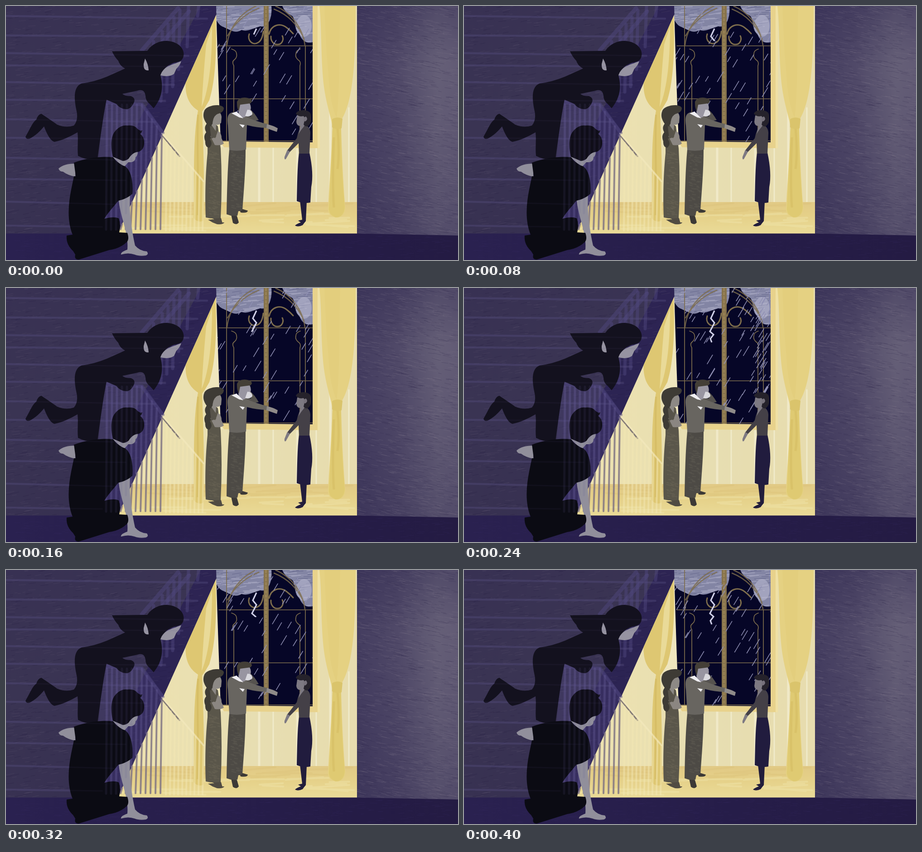
An HTML page that plays this animation: 998 by 561 pixels, repeating every 0.48 s.

```html
<!DOCTYPE html>
<html lang="en">
<head>
<meta charset="utf-8">
<title>Rainy evening on the stairs</title>
<style>
html, body { margin: 0; width: 100%; height: 100%; overflow: hidden; background: #30294f; }
svg { display: block; width: 100%; height: 100%; }
.gold { fill: none; stroke: #7d6d4c; stroke-width: 1.7; stroke-linecap: round; }
</style>
</head>
<body>
<svg viewBox="0 0 998 561" preserveAspectRatio="none">
<defs>
  <linearGradient id="leftWall" x2="1" y2="1">
    <stop offset="0" stop-color="#383153"/><stop offset=".25" stop-color="#3a3453"/>
    <stop offset=".7" stop-color="#352e50"/><stop offset="1" stop-color="#2c2354"/>
  </linearGradient>
  <linearGradient id="rightWall">
    <stop offset="0" stop-color="#443d60"/><stop offset=".4" stop-color="#504968"/>
    <stop offset=".8" stop-color="#655f77"/><stop offset="1" stop-color="#625b75"/>
  </linearGradient>
  <linearGradient id="shade" x2="0" y2="1">
    <stop offset="0" stop-color="#2c254d" stop-opacity=".35"/><stop offset=".25" stop-color="#2c254d" stop-opacity="0"/>
    <stop offset=".6" stop-color="#2c254d" stop-opacity=".1"/><stop offset="1" stop-color="#2c254d" stop-opacity=".3"/>
  </linearGradient>
  <linearGradient id="hall">
    <stop offset="0" stop-color="#2a2150"/><stop offset=".6" stop-color="#261d49"/><stop offset="1" stop-color="#241b43"/>
  </linearGradient>
  <linearGradient id="roomWall">
    <stop offset="0" stop-color="#efe3af"/><stop offset=".5" stop-color="#e7deb2"/><stop offset="1" stop-color="#e7dcae"/>
  </linearGradient>
  <linearGradient id="roomFloor" x2="0" y2="1">
    <stop offset="0" stop-color="#e1c985"/><stop offset=".4" stop-color="#e5d088"/><stop offset="1" stop-color="#eadb98"/>
  </linearGradient>
  <clipPath id="room"><path d="M473 0H775V503H247Z"/></clipPath>
  <clipPath id="pane"><path d="M464 0H677V301L474 299Q467 120 464 0Z"/></clipPath>
  <clipPath id="dark"><path d="M0 0H473L247 503H0Z"/></clipPath>
  <clipPath id="wallR"><path d="M775 0H998V507L775 503Z"/></clipPath>
  <clipPath id="clouds"><path d="M464 0H586C588 20 582 50 562 45C547 48 534 58 520 53C506 62 494 52 484 48Q470 44 464 30ZM610 0H677V80C665 84 652 77 648 61C635 55 641 32 632 22Q615 14 610 0Z"/></clipPath>
</defs>

<rect width="998" height="561" fill="url(#leftWall)"/>
<g id="stairs" clip-path="url(#dark)">
  <path d="M430 0H473L247 503H180L300 240Z" fill="#291f53" opacity=".75"/>
</g>

<g clip-path="url(#wallR)">
  <path d="M774 0H998V510H774Z" fill="url(#rightWall)"/>
  <path d="M774 0H998V510H774Z" fill="url(#shade)"/>
  <g id="wallGrain"></g>
</g>

<g clip-path="url(#room)">
  <path d="M230 0H776V504H230Z" fill="url(#roomWall)"/>
  <g id="paper"></g>
  <path d="M230 433H776V504H230Z" fill="url(#roomFloor)"/>
  <g id="boards"></g>
  <path d="M677 0H690V314L480 312L474 299L677 301Z" fill="#e8d28c"/>
  <path d="M688 0H693V314H688Z" fill="#efe0a4"/>
  <path d="M464 0L474 301L481 312L440 310L440 90Z" fill="#efe6be"/>
  <path d="M463 18C465 90 464 160 449 208Q442 221 433 233C435 290 439 380 436 474Q424 480 414 468C417 390 411 300 424 231C402 217 394 195 397 160Z" fill="#dec772"/>
  <path d="M455 45C455 110 450 180 432 223Q435 160 442 85Z" fill="#e9da98"/>
  <path d="M424 240C421 310 426 390 423 462" fill="none" stroke="#cfb75d" stroke-width="4" opacity=".55"/>
  <path d="M692 0H772C772 110 768 205 742 249Q738 262 740 274C742 330 745 400 749 443C750 461 740 468 728 467Q710 463 711 447C714 390 719 325 721 268C719 248 704 210 700 160C695 100 697 45 692 0Z" fill="#e5d182"/>
  <path d="M703 0H738C735 70 738 190 730 247C712 205 714 160 708 105Z" fill="#e0c976" opacity=".45"/>
  <path d="M721 268H740C740 340 744 400 748 443Q747 466 728 467Q712 461 713 446Q718 350 721 268Z" fill="#dfca72"/>
  <path d="M732 270Q737 325 732 360M724 290Q720 390 724 445" fill="none" stroke="#cfb55a" stroke-width="5" opacity=".4"/>
  <path d="M720 250Q731 243 743 249L741 270Q730 274 720 268Z" fill="#dac46c"/>
</g>

<g clip-path="url(#pane)">
  <path d="M460 0H680V304H460Z" fill="#060627"/>
  <g id="cloudInk" clip-path="url(#clouds)">
    <path d="M460 0H680V90H460Z" fill="#8385a4"/>
  </g>
  <ellipse cx="658" cy="44" rx="17" ry="24" fill="#bcbcd4" opacity=".55"/>
  <g class="gold">
    <path d="M470 88H677M472 205H677M474 298H677"/>
    <path d="M487 0V299M661 88V299"/>
    <path d="M498 95Q509 98 509 106Q511 113 504 119Q498 123 503 132V299"/>
    <path d="M650 95Q640 98 640 106Q638 113 645 119Q652 123 649 132V299"/>
    <path d="M488 86C493 45 520 14 552 0M489 66Q513 23 558 5" stroke-width="2.5" opacity=".8"/>
    <path d="M595 0C628 14 654 45 660 86M592 7Q637 25 658 72" stroke-width="2.5" opacity=".8"/>
    <path d="M537 62C532 76 545 88 556 81C564 77 567 66 568 56" stroke-width="3"/>
    <path d="M581 62C585 42 605 36 620 48Q628 54 634 61M585 67C584 78 592 86 600 85C610 85 614 73 610 66" stroke-width="3"/>
  </g>
  <path d="M569 0H580V301H569Z" fill="#85724c"/>
  <path d="M574 0V300" stroke="#9f8859" stroke-width="4" stroke-dasharray="7 2" opacity=".7"/>
  <path id="rain" fill="none" stroke="#8f8fb3" stroke-width="1.5" stroke-linecap="round"/>
  <path id="bolt" fill="none" stroke="#cfcfe7" stroke-width="3.2" stroke-linejoin="miter" pathLength="100" d="M553 50L545 67L553 77L543 96L551 103L544 112L547 120"/>
</g>

<!-- woman with a braid -->
<g>
  <path d="M446 472L458 471Q463 478 482 478Q480 483 466 482L456 478ZM444 466H472L475 469L478 480Q470 482 464 480L458 470Z" fill="#504b42"/>
  <path d="M450 262Q462 258 468 266L474 315Q478 390 474 468Q456 471 441 467C439 410 441 365 445 325L445 280Z" fill="#5a564a"/>
  <path d="M451 235Q474 227 476 245L475 258Q469 264 464 262L463 276L453 262Z" fill="#8d8985"/>
  <path d="M438 231C443 219 475 214 481 225Q481 235 468 238Q457 242 456 260Q450 267 452 280Q458 288 450 294Q458 304 449 313Q439 312 440 299Q435 287 442 279Q436 269 443 260Q432 245 438 231Z" fill="#3e3b35"/>
  <path d="M451 287L462 292L468 276Q476 280 476 292L481 304Q474 309 461 307Z" fill="#8b8681"/>
  <path d="M450 265Q464 272 464 289L453 293Z" fill="#57534a"/>
</g>

<!-- man pointing -->
<g>
  <path d="M496 456L510 464L514 478Q509 485 501 479ZM514 446L534 452Q533 458 518 456Z" fill="#3c3936"/>
  <path d="M493 317H529C529 360 525 410 522 450Q518 454 513 453L511 463Q499 465 487 460C488 410 489 360 493 317Z" fill="#4d4a45"/>
  <path d="M537 226Q549 236 558 252L531 257L529 242L541 244Z" fill="#56534f"/>
  <path d="M500 235C488 237 488 250 490 264L493 318Q512 322 530 317L532 263Q554 269 576 269L577 261Q551 254 532 246L520 237Z" fill="#686560"/>
  <path d="M576 261Q590 264 600 270L598 278L575 270Z" fill="#8f8b89"/>
  <path d="M512 218Q520 206 537 213Q546 228 533 240Q523 252 514 242Z" fill="#9895a1"/>
  <path d="M498 237L509 233L524 248L515 246ZM515 261L527 263L523 269Z" fill="#f0eff3"/>
  <path d="M533 229Q544 229 544 239Q538 246 528 243Z" fill="#d9d8de"/>
  <path d="M510 216C508 203 527 199 539 205Q546 209 540 215L517 218L514 233Q510 226 510 216Z" fill="#443f37"/>
</g>
<g id="cloth"></g>

<!-- woman in a long skirt -->
<g>
  <path d="M649 430L664 432L662 475Q657 481 655 484Q645 489 638 485Q642 481 651 478L645 474L654 472Z" fill="#221d3b"/>
  <path d="M647 324H670Q680 370 674 400L672 434Q658 437 642 431C643 395 643 355 647 324Z" fill="#211c3e"/>
  <path d="M655 262Q671 263 672 280L670 326H647L646 303L626 323L621 319L642 292Q646 271 655 262Z" fill="#444047"/>
  <path d="M621 318L627 322L618 338Q614 341 615 333ZM643 242Q659 235 661 252L658 266Q650 275 646 283L650 265Q642 265 641 256Z" fill="#7d7982"/>
  <path d="M640 238C643 229 662 227 671 235C677 244 674 267 662 266L657 262Q661 248 657 243Q647 246 640 238Z" fill="#25222b"/>
  <path d="M658 246Q664 241 665 250Q661 258 657 253Z" fill="#76717b"/>
</g>

<path d="M0 502.5H775L998 507V561H0Z" fill="url(#hall)"/>
<g id="hallGrain"></g>

<path d="M216 208L262 212L300 215L348 276L284 420L250 496L216 500L205 330Z" fill="#4b4278" opacity=".35" clip-path="url(#dark)"/>
<g id="rails"></g>

<!-- girl leaning over the rail -->
<path d="M234 100L312 99C322 84 338 77 354 77C380 78 395 94 392 110Q390 122 377 124C362 127 350 134 341 153C347 176 347 199 326 226Q320 219 317 216Q308 209 308 198C306 186 300 184 290 187Q271 191 257 194Q261 199 276 199Q286 203 283 212Q278 225 268 228Q254 229 243 216L222 207C215 240 207 300 202 338Q180 342 159 331C157 312 160 298 158 279C142 288 124 297 107 300Q96 298 84 266Q70 283 56 291Q46 297 43 289C53 272 58 257 67 251Q70 240 78 238Q96 250 113 262Q132 270 150 264Q161 251 155 228C150 203 149 178 167 171Q194 168 223 156L263 138Q252 133 248 121Q240 113 234 100Z" fill="#13111e"/>
<path d="M307 116Q314 128 315 142Q303 144 304 128ZM341 153Q346 137 365 130L387 122Q384 131 376 139L371 150Q360 158 341 153Z" fill="#9693a1"/>

<!-- crouching boy -->
<path d="M116 359Q128 348 153 348V377Q137 374 126 366Q118 366 116 359ZM236 333Q257 331 273 326L291 321Q291 331 286 334Q286 346 270 345L262 354Q249 349 236 333ZM249 430L274 418C272 450 276 490 285 529Q295 541 311 542Q316 548 309 551Q294 553 284 549Q270 544 254 549Q252 544 268 538C271 500 253 470 249 430Z" fill="#918f9b"/>
<path d="M236 333C231 313 231 291 239 279Q251 262 268 264Q283 262 290 271Q298 278 301 274Q300 281 296 282Q306 290 305 303Q305 317 293 322Q279 323 271 337Q264 343 257 342Z" fill="#0f0d18"/>
<path d="M150 346C175 336 210 331 236 334Q249 350 263 354C277 364 281 390 279 415Q265 427 248 430C238 443 226 455 217 470Q238 464 249 469Q254 482 250 500L268 501Q273 516 266 522Q251 536 228 539L161 560Q150 561 153 549L148 541Q132 526 134 507L147 505C135 475 137 440 144 405L150 376H154Z" fill="#0b0b13"/>
<g id="sheen" clip-path="url(#dark)"></g>
</svg>

<script>
const STEP = 80, LOOP = 480, STEPS = LOOP / STEP;
const boltLength = [17, 38, 64, 100, 77, 100];
const drops = [52, 62, 66, 66, 60, 70];
const get = id => document.getElementById(id);
const range = n => [...Array(n).keys()];

function random(seed) {
  return () => {
    seed = (seed * 1664525 + 1013904223) >>> 0;
    return seed / 4294967296;
  };
}

function add(parent, d, stroke, width, opacity = 1) {
  const path = document.createElementNS("http://www.w3.org/2000/svg", "path");
  const attrs = { d, stroke, "stroke-width": width, opacity, fill: "none", "stroke-linecap": "round" };
  for (const key in attrs) path.setAttribute(key, attrs[key]);
  get(parent).append(path);
}

// Scattered short brush marks inside a box
function marks(seed, count, [x, y, w, h], size, slope) {
  const r = random(seed);
  return range(count).map(() => {
    const len = size * (.4 + r());
    return `M${(x + w * r()).toFixed(1)} ${(y + h * r()).toFixed(1)}l${len.toFixed(1)} ${(len * (slope + (r() - .5) * .2)).toFixed(1)}`;
  }).join("");
}

function paintTexture() {
  const left = [0, 0, 440, 502], right = [770, 0, 228, 506];
  add("stairs", marks(11, 700, left, 13, -.15), "#6d677c", 1, .2);
  add("stairs", marks(12, 600, left, 13, -.15), "#1d1739", 1, .25);
  add("wallGrain", marks(13, 700, right, 14, .2), "#857d90", 1, .24);
  add("wallGrain", marks(14, 650, right, 14, .2), "#2c2549", 1, .25);
  add("hallGrain", marks(15, 250, [0, 508, 985, 50], 12, 0), "#3a2e65", 1, .25);
  add("cloudInk", marks(16, 110, [455, 0, 215, 85], 22, -.1), "#b8b8d0", 2, .5);
  add("cloudInk", marks(17, 70, [455, 0, 215, 85], 18, -.1), "#55587e", 1.5, .45);
  add("boards", marks(18, 16, [270, 438, 440, 22], 80, 0), "#d8bd76", 4, .3);
  add("boards", marks(19, 18, [250, 460, 470, 38], 80, 0), "#f1e7b2", 4, .35);
  add("cloth", marks(20, 90, [447, 315, 21, 148], 5, .2), "#7a7562", 2, .28);
  add("cloth", marks(21, 90, [494, 322, 26, 125], 5, .2), "#716b60", 2, .25);
  [500, 559, 590, 643, 685, 716, 757].forEach((x, i) => add("paper", `M${x} 225V432`, "#f3edcf", i % 2 ? 5 : 3, .8));
}

function paintStairs() {
  const treads = [22, 65, 104, 131, 168, 207, 250, 291, 335, 382, 432, 485];
  const steps = treads.map((y, i) => `M-4 ${y}L${455 - y * .5} ${y + (i % 2 ? 3 : 6)}`).join("");
  add("stairs", steps, "#575080", 4.5, .33);
  add("sheen", steps, "#575080", 3, .08);

  add("stairs", "M300 98L380 5M318 112L404 12", "#51487f", 9, .45);
  [326, 345, 358, 371, 384, 403, 426].forEach((x, i) =>
    add("stairs", `M${x} ${Math.max(-5, 110 - (x - 300) * 1.2)}L${x - 3} ${[200, 210, 190, 178, 140, 90, 22][i]}`, "#51487f", 7, .45));
  add("rails", "M220 213L300 217L346 280", "#514880", 8, .45);
  add("rails", "M345 286L383 332", "#776e70", 3, .9);
  add("rails", "M345 282L436 387", "#f5eabd", 4, .65);

  for (let x = 223; x < 350; x += 11) {
    const top = x < 300 ? 218 : 218 + (x - 300) * 1.45;
    const edge = Math.min(494, Math.max(top, (473 - x) / .45));
    const shaded = `M${x} ${top}L${x - 2} ${edge}`;
    add("rails", shaded, "#655b94", 5, .3);
    add("sheen", shaded, "#655b94", 5, .12);
    if (edge < 492) add("rails", `M${x} ${edge}L${x - 3} 493`, "#7c7183", 4, .8);
  }
  for (let x = 355; x < 438; x += 9) add("rails", `M${x} ${292 + (x - 345) * 1.05}L${x - 2} 496`, "#f4e8b4", 4, .5);
}

const streak = (x, y, len) => `M${x.toFixed(1)} ${y.toFixed(1)}l${(len * .6).toFixed(1)} ${-len.toFixed(1)}`;

// Each drop slides down its own slanted track once per loop; tracks are shuffled over loose cells
const rng = random(71);
const tracks = range(80).map(i => ({
  x: 470 + (i * 7 % 8 + rng()) * 33,
  y: -30 + (i * 3 % 10 + rng()) * 27,
  len: 10 + 12 * rng(),
  phase: rng()
}));
const gust = range(42).map(() => streak(590 + 85 * Math.sqrt(rng()), 10 + 260 * rng(), 10 + 12 * rng())).join("");

function makeRain(count, step) {
  const fall = tracks.slice(0, count).map(({ x, y, len, phase }) => {
    const travel = 96 * ((phase + step / STEPS) % 1);
    return streak(x - travel * .6, y + travel, len);
  }).join("");
  return step === 3 ? fall + gust : fall;
}

paintTexture();
paintStairs();
const rainPaths = drops.map(makeRain);
let shown = -1;

function draw(time) {
  const step = Math.floor((time % LOOP) / STEP);
  if (step === shown) return;
  shown = step;
  get("rain").setAttribute("d", rainPaths[step]);
  get("bolt").setAttribute("stroke-dasharray", `${boltLength[step]} 200`);
}

function tick() {
  draw(performance.now());
  requestAnimationFrame(tick);
}
tick();
</script>
</body>
</html>
```
